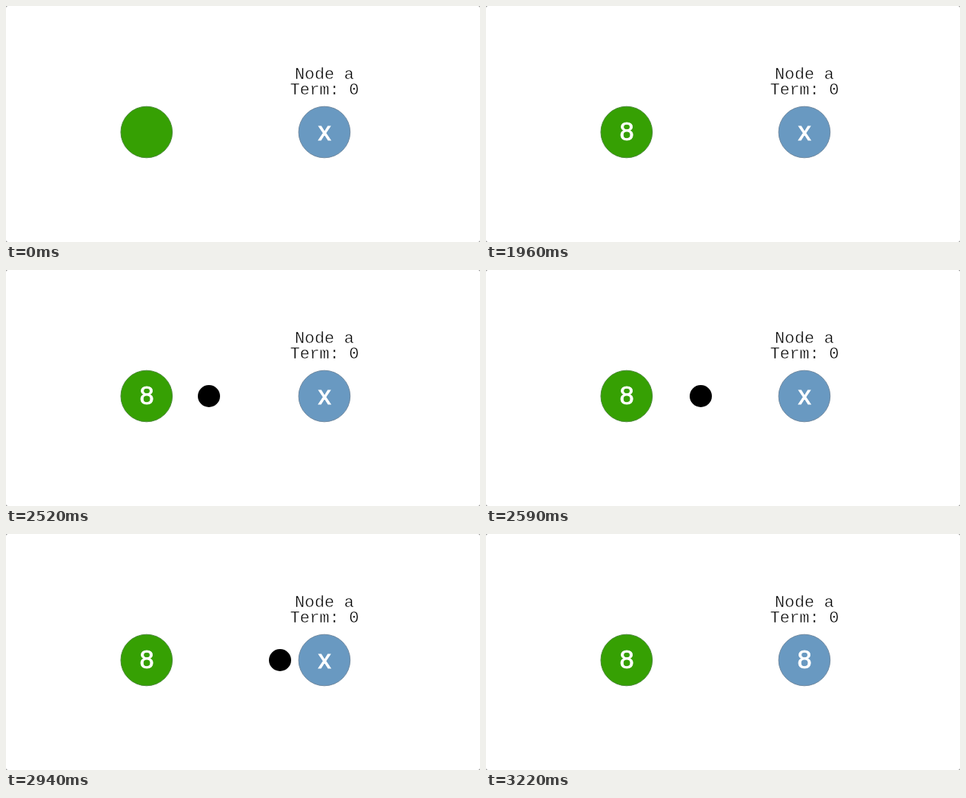
An HTML page that plays this animation: 640 by 320 pixels, repeating every 5.11 s.

```html
<!DOCTYPE html>
<html lang="en">
<head>
<meta charset="utf-8">
<title>Node message</title>
<style>
  html, body { margin: 0; width: 100%; height: 100%; overflow: hidden; background: #8a8a8a; }
  svg { display: block; width: 640px; height: 320px; }
  text { text-anchor: middle; }
  .label { font: 22.2px "Courier New", "Liberation Mono", monospace; fill: #000; stroke: #fff; stroke-width: .5; }
  .value { font: 34.5px "Liberation Sans", Arial, sans-serif; fill: #fff; stroke: #fff; stroke-width: 1; }
</style>
</head>
<body>
<svg viewBox="0 0 640 320">
  <rect width="640" height="320" rx="3" fill="#fff"/>
  <text class="label" x="430" y="99">Node a</text>
  <text class="label" x="430" y="120">Term: 0</text>
  <circle cx="189.8" cy="171" r="34.8" fill="#36a003" stroke="#4d8a3c"/>
  <circle cx="429.9" cy="171" r="34.8" fill="#6999c1" stroke="#7089a0"/>
  <text class="value" id="client" x="190" y="182"></text>
  <text class="value" id="node" x="430" y="182">x</text>
  <circle id="message" cy="171" r="15"/>
</svg>
<script>
  const LOOP = 5110, STEP = 70;
  const TYPED = 28, SENT = 32, RECEIVED = 46;   // in steps
  const [client, node, message] = ["client", "node", "message"].map(id => document.getElementById(id));
  const start = performance.now();

  function draw() {
    const step = Math.floor((performance.now() - start) % LOOP / STEP);
    client.textContent = step >= TYPED ? "8" : "";
    node.textContent = step >= RECEIVED ? "8" : "x";
    message.setAttribute("cx", 210 + 16 * (step - SENT));
    message.style.display = step >= SENT && step < RECEIVED ? "" : "none";
    requestAnimationFrame(draw);
  }
  draw();
</script>
</body>
</html>
```
